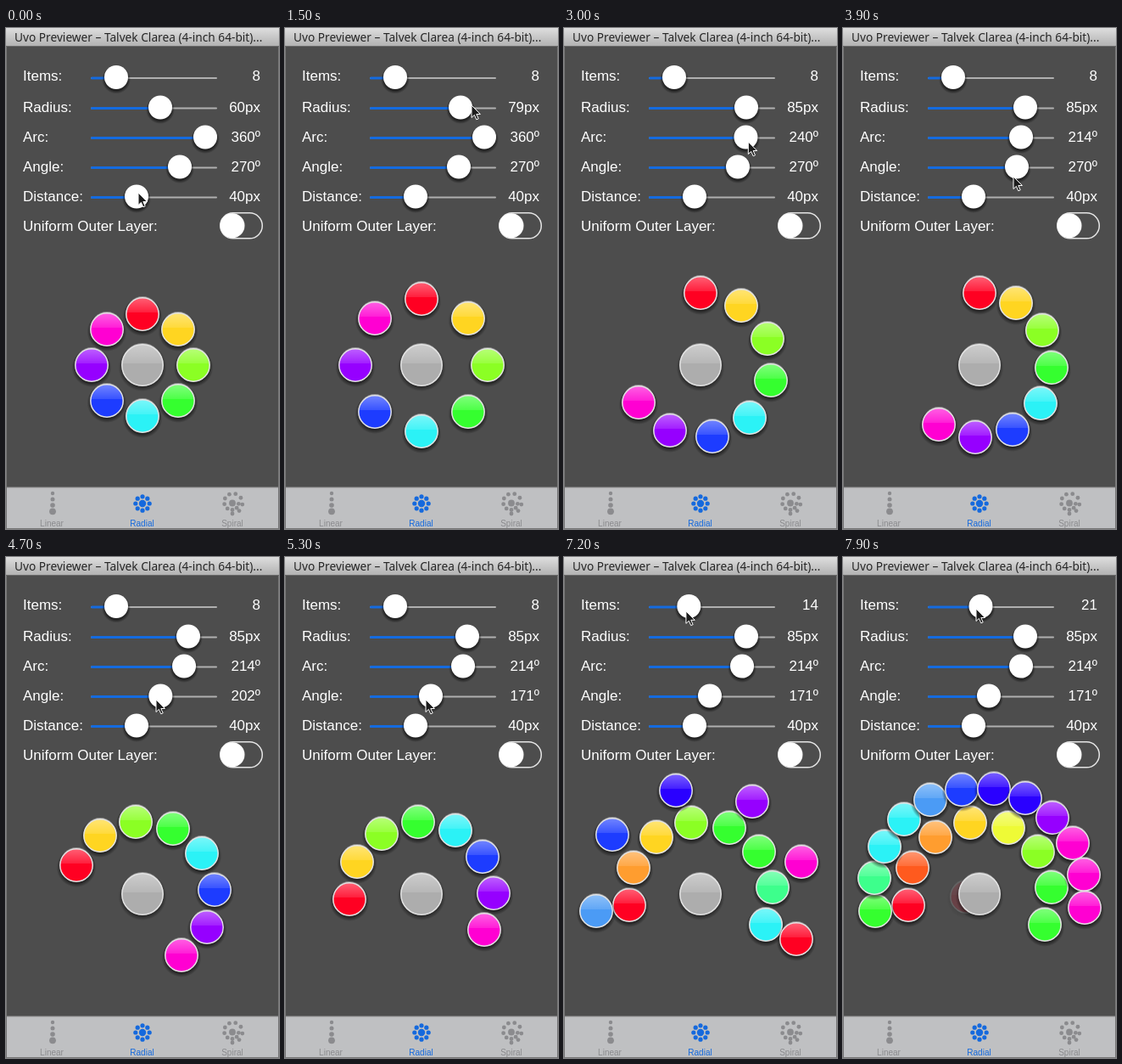
An HTML page that plays this animation: 322 by 590 pixels, repeating every 8000 ms.

```html
<!DOCTYPE html>
<html lang="en">
<head>
<meta charset="utf-8">
<title>Radial layout</title>
<style>
  html, body { margin: 0; width: 100%; height: 100%; overflow: hidden; background: #4d4d4d; }
  svg { display: block; width: 322px; height: 590px; }
  text { font-family: "Liberation Sans", Arial, sans-serif; font-size: 17px; fill: #fff; }
  .title { font-family: "Noto Sans", "Open Sans", sans-serif; font-size: 13.7px; fill: #262626; }
  .value { text-anchor: end; }
  .tab { font-size: 10px; text-anchor: middle; fill: #8b8b8e; }
  .icon { fill: #8b8b8e; }
  .active { fill: #1569dd; }
</style>
</head>
<body>
<svg id="stage" viewBox="0 0 322 590">
  <defs>
    <linearGradient id="bar" x2="0" y2="1">
      <stop stop-color="#dedede"/><stop offset="1" stop-color="#b2b2b2"/>
    </linearGradient>
    <linearGradient id="gloss" x2="0" y2="1">
      <stop stop-color="#fff" stop-opacity=".4"/><stop offset="1" stop-color="#fff" stop-opacity=".12"/>
    </linearGradient>
    <radialGradient id="shade">
      <stop offset=".78" stop-color="#000" stop-opacity=".55"/><stop offset="1" stop-color="#000" stop-opacity="0"/>
    </radialGradient>
  </defs>
  <rect width="322" height="590" fill="#4d4d4d"/>
  <rect width="322" height="21" fill="url(#bar)"/>
  <rect y="21" width="322" height="1" fill="#6a6a6a"/>
  <text class="title" x="10" y="16">Uvo Previewer – Talvek Clarea (4-inch 64-bit)...</text>

  <g id="sliders"></g>
  <text x="20" y="239">Uniform Outer Layer:</text>
  <rect x="252.8" y="217.8" width="49.5" height="30" rx="15" fill="none" stroke="#e6e6e6" stroke-width="1.5"/>
  <circle cx="267" cy="232.8" r="14.5" fill="#fff"/>

  <g id="balls"></g>

  <rect y="541" width="322" height="48" fill="#bfc0c2"/>
  <rect y="540.5" width="322" height="1" fill="#8f8f91"/>
  <rect y="589" width="322" height="1" fill="#777"/>
  <path d="M.5 22V590M321.5 22V590" stroke="#777"/>
  <g id="linear" class="icon"></g>
  <g id="radial" class="active"></g>
  <g id="spiral" class="icon"></g>
  <text class="tab" x="54" y="587">Linear</text>
  <text class="tab active" x="160.5" y="587">Radial</text>
  <text class="tab" x="267" y="587">Spiral</text>

  <path id="cursor" d="M0 0V14.5L3.4 11.4L5.8 16.8L8.2 15.8L5.8 10.5H10.4Z" fill="#1c1c1c" stroke="#fff" stroke-width="1"/>
</svg>
<script>
const LOOP = 8000, STEP = 100, MAX = 21, SIZE = 40, GAP = 40, LAG = 50;
const CENTER = { x: 161, y: 397 };
const RAD = Math.PI / 180;
const $ = id => document.getElementById(id);

function add(parent, tag, attrs, text) {
  const el = document.createElementNS("http://www.w3.org/2000/svg", tag);
  for (const key in attrs) el.setAttribute(key, attrs[key]);
  if (text) el.textContent = text;
  return parent.appendChild(el);
}
const place = (el, x, y) => el.setAttribute("transform", `translate(${x.toFixed(2)} ${y.toFixed(2)})`);
const mix = (a, b, p) => a + (b - a) * p;

// Linear value of a [time, value] track
function at(track, t) {
  if (t <= track[0][0]) return track[0][1];
  for (let i = 1; i < track.length; i++) {
    const [t0, a] = track[i - 1], [t1, b] = track[i];
    if (t <= t1) return mix(a, b, (t - t0) / (t1 - t0));
  }
  return track[track.length - 1][1];
}

const tracks = {
  items: [[6400, 8], [7900, 21]],
  radius: [[800, 60], [1500, 79], [1800, 85]],
  arc: [[2100, 360], [2400, 292], [3300, 214]],
  angle: [[3950, 270], [4700, 202], [5300, 171]],
  distance: [[0, 40]],
  // What the ring shows: angle between first and last ball, and its eased rotation
  span: [[2100, 315], [2400, 289.4], [3300, 214]],
  turn: [[3950, 270], [4700, 203.6], [5400, 171]]
};
const path = [
  [0, 156, 194], [300, 156, 194], [800, 195, 91], [1500, 220, 91], [1800, 228, 91],
  [2100, 238, 134], [2400, 226, 134], [3300, 213, 134], [3900, 201, 175], [4700, 177, 168],
  [5300, 166, 168], [5700, 166, 168], [6200, 129, 67], [6400, 129, 67], [7900, 157, 61]
];
const pathX = path.map(([t, x]) => [t, x]);
const pathY = path.map(([t, , y]) => [t, y]);

// Limited palette; each ball takes the entry with the nearest hue
const palette = [
  [0, "#ff0022"], [17, "#ff5a1e"], [34, "#ff9d2f"], [48, "#ffd521"], [65, "#eefa36"],
  [85, "#8bff24"], [120, "#35ff2f"], [155, "#3dff8c"], [181, "#2bf2f6"], [206, "#4b9bf5"],
  [228, "#1d3cff"], [245, "#2a00ff"], [272, "#9600ff"], [308, "#ff00d2"], [360, "#ff0022"]
];
const tint = hue => palette.reduce((a, b) => Math.abs(b[0] - hue) < Math.abs(a[0] - hue) ? b : a)[1];

const sliders = [
  { key: "items", label: "Items:", y: 58, unit: "", knobX: v => 115 + (v - 2) * 2.5 },
  { key: "radius", label: "Radius:", y: 93.5, unit: "px", knobX: v => 182 + (v - 60) * 1.32 },
  { key: "arc", label: "Arc:", y: 128.5, unit: "º", knobX: v => 235 - (360 - v) * 0.171 },
  { key: "angle", label: "Angle:", y: 163.5, unit: "º", knobX: v => 115 + v / 3 },
  { key: "distance", label: "Distance:", y: 198.5, unit: "px", knobX: () => 154 }
];
for (const s of sliders) {
  const g = $("sliders"), base = s.key === "items" ? 62 : s.y + 5.5;
  add(g, "text", { x: 20, y: base }, s.label);
  s.text = add(g, "text", { class: "value", x: 300, y: base });
  add(g, "rect", { x: 100, y: s.y, width: 149, height: 2, rx: 1, fill: "#b0b0b0" });
  s.fill = add(g, "rect", { x: 100, y: s.y - 0.5, height: 3, rx: 1.5, fill: "#146be0" });
  s.knob = add(g, "g");
  add(s.knob, "circle", { cy: 2.5, r: 17, fill: "url(#shade)" });
  add(s.knob, "circle", { r: 14, fill: "#fff" });
}

function makeBall(r) {
  const g = add($("balls"), "g");
  add(g, "circle", { cy: 2.5, r: r + 3.5, fill: "url(#shade)" });
  g.body = add(g, "circle", { r: r - 0.5, fill: "#adadad" });
  add(g, "path", { d: `M${1 - r} -2A${r - 1} ${r - 1} 0 0 1 ${r - 1} -2Z`, fill: "url(#gloss)" });
  add(g, "circle", { r: r - 0.8, fill: "none", stroke: "#e2e2e2", "stroke-width": 1.5 });
  return g;
}
const balls = Array.from({ length: MAX }, () => makeBall(SIZE / 2));
place(makeBall(25), CENTER.x, CENTER.y);

function dot(id, cx, cy, r) { add($(id), "circle", { cx, cy, r }); }
for (let i = 0; i < 3; i++) dot("linear", 55, 548 + i * 7, 2.2 + i * 0.3);
dot("linear", 55, 569.3, 3.9);
dot("radial", 161, 560, 4.2);
for (let i = 0; i < 8; i++) {
  const a = i * 45 * RAD;
  dot("radial", 161 + 8.2 * Math.cos(a), 560 + 8.2 * Math.sin(a), 2.6);
}
dot("spiral", 267, 559.5, 3.9);
for (let i = 0; i < 12; i++) {
  const a = (10 + i * 40) * RAD, d = 7.5 + i * 0.5;
  dot("spiral", 267 + d * Math.cos(a), 559 + d * Math.sin(a), 2.4);
}

function drawBalls(t) {
  const amount = at(tracks.items, t), count = Math.floor(amount);
  const radius = at(tracks.radius, t - LAG), span = at(tracks.span, t), turn = at(tracks.turn, t);
  const inner = Math.min(count, 8), outer = count - inner;
  balls.forEach((ball, i) => {
    ball.style.display = i < count ? "" : "none";
    if (i >= count) return;
    const far = i >= inner;
    const index = far ? i - inner : i, size = far ? outer : inner;
    const a = (turn + span * index / Math.max(1, size - 1)) * RAD;
    const d = far ? radius + GAP : radius;
    // New balls slide out from behind the centre
    const grow = far ? Math.min(1, (amount - i - 1) * 1.2) : 1;
    const x = mix(-15, d * Math.cos(a), grow), y = mix(3, d * Math.sin(a), grow);
    place(ball, CENTER.x + Math.round(x), CENTER.y + Math.round(y));
    ball.setAttribute("opacity", mix(0.15, 1, grow));
    ball.body.setAttribute("fill", tint(360 * i / count));
  });
}

function draw() {
  const t = Math.floor(performance.now() % LOOP / STEP) * STEP;
  for (const s of sliders) {
    const v = at(tracks[s.key], t), x = s.knobX(v);
    const shown = s.key === "items" ? Math.floor(v) : Math.round(v);
    s.text.textContent = shown + s.unit;
    s.fill.setAttribute("width", x - 100);
    place(s.knob, x, s.y);
  }
  drawBalls(t);
  place($("cursor"), at(pathX, t), at(pathY, t));
  requestAnimationFrame(draw);
}
draw();
</script>
</body>
</html>
```
